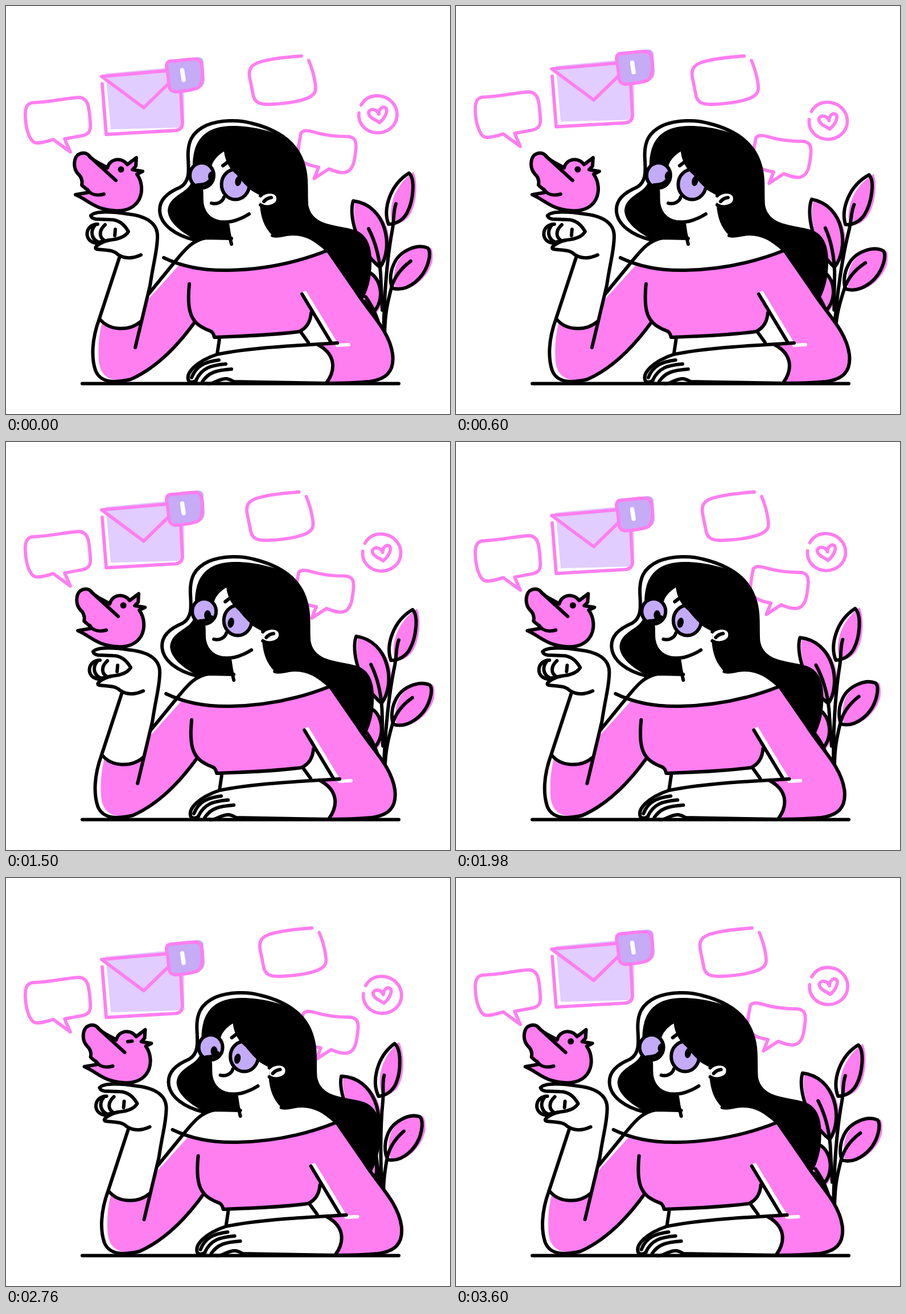
An HTML page for the animation above (3.66 s loop, 780 by 718 pixels).

```html
<!DOCTYPE html>
<html lang="en">
<head>
<meta charset="utf-8">
<title>Woman with a bird and messages</title>
<style>
html, body { margin: 0; width: 100%; height: 100%; overflow: hidden; background: #fff; }
svg { display: block; width: 780px; height: 718px; }
path, circle, ellipse { stroke-linecap: round; stroke-linejoin: round; }
.ink { fill: none; stroke: #000; stroke-width: 6; }
.skin { fill: #fff; stroke: #000; stroke-width: 6; }
.white { fill: #fff; }
.rose { fill: #ff7ef0; }
.roseInk { fill: #ff7ef0; stroke: #000; stroke-width: 6; }
.note { fill: none; stroke: #ff7ef0; stroke-width: 5.8; }
.lens { fill: #c3abf8; }
</style>
</head>
<body>
<svg viewBox="0 0 780 718">
  <defs>
    <clipPath id="lensL"><ellipse cx="344" cy="298" rx="21" ry="22"/></clipPath>
    <clipPath id="lensR"><ellipse cx="403" cy="314" rx="24.500" ry="26.500"/></clipPath>
  </defs>

  <g id="mail">
    <path fill="#e1cdff" d="M175 119 L290 108 L313 142 V205 Q313 214 303 214 L184 217Z"/>
    <path class="note" d="M169 137 L176 226 L298 219 Q309 218 310 207 L307 150 M285 137 L242 179 L168 124 L282 114"/>
    <path fill="#c6abf6" d="M291 94 L336 90 Q348 90 347 102 L349 128 Q349 144 335 146 L297 150 Q285 148 285 138 L283 104 Q283 95 291 94Z"/>
    <path class="note" d="M291 97 C305 97 322 92 335 94 C345 97 344 107 345 117 C345 128 344 139 337 144 C325 149 309 150 297 151 C284 149 287 139 285 128 C285 118 281 109 282 104 Q283 97 291 97Z"/>
    <path d="M309.500 113 L312 130" fill="none" stroke="#fff" stroke-width="7.500"/>
  </g>
  <path id="chatL" class="note" d="M50 170 C80 169 105 162 128 161 C146 162 146 180 148 205 C150 222 144 227 130 229 L103 234 L113 257 L83 235 C70 239 54 244 48 239 C38 231 33 206 34 187 C35 173 42 170 50 170Z"/>
  <path id="chatTop" class="note" d="M519 88 C490 90 461 94 445 99 C430 104 426 112 428 125 L434 155 C436 170 446 174 465 173 C490 172 515 168 530 162 C543 156 546 150 543 135 C541 120 537 108 532 96"/>
  <path id="chatR" class="note" d="M518 224 C522 218 530 219 540 222 C560 228 585 230 600 230 C614 231 616 240 614 255 C612 275 609 290 596 293 C585 295 575 290 567 287 L541 304 L549 284 C532 281 522 277 515 268 C510 260 516 235 518 224Z"/>
  <g id="like" class="note">
    <path d="M624 174 C632 160 645 157 656 158 C674 160 687 174 687 191 C687 210 671 223 652 223 C632 222 618 207 620 188"/>
    <path d="M655 190 C652 181 640 179 637 187 C637 197 650 200 656 205 C664 199 671 187 668 180 C663 174 655 181 655 190"/>
  </g>

  <g id="plant">
    <g class="rose" transform="translate(2 0)">
      <path d="M678 385 C668 360 677 318 714 292 C721 305 721 345 709 365 C702 378 690 384 678 385Z"/>
      <path d="M745 426 C725 418 694 430 684 455 C678 470 678 490 684 499 C709 503 739 480 747 450 C748 440 748 430 745 426Z"/>
      <path d="M612 343 C604 370 615 420 657 462 C686 425 672 354 612 343Z"/>
      <path d="M638 470 C662 480 668 520 648 541 L625 520Z"/>
    </g>
    <g class="ink">
      <path d="M672 384 C662 358 674 315 708 294 C719 304 716 343 704 365 C697 377 685 384 672 384Z"/>
      <path d="M741 426 C723 418 691 430 681 455 C674 470 674 490 680 497 C705 503 734 480 742 450 C745 440 745 430 741 426Z"/>
      <path d="M610 343 C602 367 614 424 657 460 C682 425 668 350 610 343Z"/>
      <path d="M640 470 C660 481 666 520 644 540 L630 520"/>
      <path d="M685 348 C680 362 682 375 679 392 C670 440 664 500 663 590 M711 449 C692 463 680 481 676 500 C668 530 665 550 665 590"/>
      <path d="M637 392 C650 417 656 445 658 470 L661 535 M632 512 C645 530 656 555 660 582"/>
    </g>
  </g>

  <g id="woman">
    <!-- hair -->
    <path class="skin" d="M329 411 C300 404 271 386 270 360 C269 338 289 326 306 319 C323 309 321 290 320 270 C318 240 326 222 352 210 C376 200 410 200 430 206 C476 217 505 238 518 267 C531 297 526 320 528 350 C534 390 580 388 608 396 C640 404 641 440 638 470 C636 490 631 502 625 514 L520 420Z"/>
    <path d="M328 290 C326 250 338 211 398 211 C435 211 470 221 492 232 C525 255 528 305 528 350 C536 391 583 389 608 396 C640 404 641 440 638 470 C636 490 631 502 625 514 L565 432 L395 410 C370 405 350 407 331 410 C311 400 285 382 284 360 C286 340 302 334 316 323 C324 316 329 308 328 290Z"/>

    <!-- skin -->
    <path class="white" d="M383 256 C371 263 362 274 361 284 L341 318 C343 336 342 351 349 364 C357 378 375 382 389 381 L396 409 L352 408 C326 412 312 432 300 446 L246 512 L248 600 L330 664 L562 664 L640 560 L565 430 C540 407 522 399 500 402 C485 406 475 405 468 404 C453 389 448 372 446 352 L448 333 C424 324 400 303 390 276Z"/>
    <path class="ink" d="M343 322 C345 335 341 348 349 362 C358 378 376 383 397 379 Q413 375 427 366 M389 382 Q391 400 396 419"/>
    <path class="skin" d="M447 334 C455 324 477 325 478 338 C479 351 460 358 447 350"/>
    <path class="ink" d="M453 344 Q458 338 466 337 M361 347 C371 350 381 344 383 336 M381 281 L389 275"/>

    <!-- glasses -->
    <ellipse class="lens" cx="344" cy="298" rx="21" ry="22"/>
    <g clip-path="url(#lensL)"><ellipse id="eyeL" cx="344" cy="298" rx="6" ry="9"/></g>
    <path class="ink" d="M336 315 Q351 315 357 308"/>
    <ellipse class="ink" cx="344" cy="298" rx="21" ry="22"/>
    <ellipse class="lens" cx="403" cy="314" rx="24.500" ry="26.500"/>
    <g clip-path="url(#lensR)"><ellipse id="eyeR" cx="403" cy="314" rx="5.500" ry="9"/></g>
    <ellipse class="ink" cx="403" cy="314" rx="24.500" ry="26.500"/>
    <path d="M383 256 C385 275 395 289 405 297 C420 316 433 328 449 334 L475 325 L440 240Z"/>

    <!-- top and sleeves -->
    <path class="rose" d="M304 456 C340 467 375 467 420 465 C480 462 520 449 565 431 L612 498 C638 540 674 570 680 614 C683 647 662 659 630 662 L562 664 C578 647 580 615 553 598 L578 592 L537 540 C533 556 524 570 514 573 C475 579 420 580 368 583 L362 572 C348 570 336 562 331 557 C300 600 265 640 213 658 C180 662 166 650 163 625 C161 598 164 575 169 556 C190 572 216 572 236 556 L249 517Z"/>
    <path class="white" d="M518 505 L527 501 L582 592 L571 594Z"/>
    <path class="white" d="M537 540 L571 593 L530 594 L516 573 C528 567 535 554 537 540Z"/>
    <path fill="none" stroke="#fff" stroke-width="6" d="M582 597 L602 596"/>
    <path class="ink" d="M277 443 C310 459 345 466 390 465 C455 464 510 452 565 430 M396 409 L352 408 C326 412 312 432 300 446 L247 511"/>
    <path class="ink" d="M468 404 C478 407 490 401 502 401 C530 400 547 415 565 430 L612 498 C638 540 673 570 679 612 C683 644 667 657 638 661 Q605 664 562 664"/>
    <path class="ink" d="M322 489 C318 530 322 554 346 566 C357 573 363 569 366 583 C420 581 470 579 515 573 C530 566 535 553 536 540 M375 585 L371 612 M518 574 L531 592 M520 507 L571 592"/>

    <!-- resting forearm -->
    <path class="white" d="M582 593 C500 599 430 602 371 614 C335 625 318 644 321 663 H562 C580 640 576 610 550 597Z"/>
    <g class="ink">
      <path d="M582 593 C500 598 430 601 371 613 C335 625 314 646 321 660 Q327 664 334 659"/>
      <path d="M548 596 C579 613 580 640 563 663 M326 654 C334 633 350 626 374 623 M334 658 C344 637 360 632 386 630 M345 661 C356 644 371 641 396 639 M352 664 C366 667 372 655 388 656 Q394 657 400 661 L450 662 L566 664"/>
    </g>

    <!-- raised arm -->
    <path class="white" d="M200 440 L164 550 C180 572 218 573 238 554 L262 445 C278 390 250 367 215 365 L155 365 L150 410 L162 428Z"/>
    <path class="ink" d="M200 440 L164 550 C150 588 150 620 157 641 C166 665 194 663 219 657 C264 637 300 600 331 557 M164 550 C181 572 216 573 237 555"/>
    <path class="ink" d="M149 369 C156 360 188 362 214 366 C249 370 266 384 266 405 C266 430 260 445 253 492 L227 601"/>
    <path class="skin" d="M161 384 C138 384 136 414 157 417 L181 412 C201 410 210 405 215 397 C207 383 196 376 184 376 L158 375 Q150 374 149 369"/>
    <path class="ink" d="M156 386 C147 397 151 410 161 415 M174 385 C162 396 164 407 173 413 M192 393 L191 404 M181 412 C165 416 151 426 160 428 C178 430 188 429 196 437 C208 445 222 445 237 438"/>

    <!-- bird -->
    <path class="roseInk" d="M178 285 C183 267 204 266 213 279 L229 267 L228 282 L222 288 L240 291 L230 296 C240 310 240 328 234 340 C222 363 194 363 171 357 C151 352 141 340 122 332 L145 328 C143 321 138 321 133 315 C135 307 131 299 127 296 C117 285 119 269 126 262 C135 256 143 259 147 265 C157 275 168 278 178 285Z"/>
    <path class="ink" d="M147 265 L193 307 M143 323 C149 333 161 334 172 331"/>
    <circle id="birdEye" cx="202" cy="287.500" r="5.500"/>
    <path id="birdLid" class="ink" d="M198 288 L206 287"/>
  </g>
  <path class="ink" d="M134 664.500 H690"/>
</svg>
<script>
const LOOP = 3660, STEP = 60;
const KEYS = [-45, 880, 1755, 2680, 3615];
const el = id => document.getElementById(id);
const clamp = x => Math.min(1, Math.max(0, x));
const smooth = x => x * x * (3 - 2 * x);
const ramp = (t, a, b) => smooth(clamp((t - a) / (b - a)));
const move = (id, x, y) => el(id).setAttribute("transform", `translate(${x.toFixed(2)} ${y.toFixed(2)})`);

// Four nearly linear strokes: out, back, out the other way, back.
function sway(t) {
  if (t >= KEYS[4]) t -= LOOP;
  let i = 0;
  while (i < 3 && t >= KEYS[i + 1]) i++;
  const p = (t - KEYS[i]) / (KEYS[i + 1] - KEYS[i]);
  const e = p * 0.8 + smooth(p) * 0.2;
  const reach = i % 2 ? 1 - e : e;
  return { reach, side: i < 2 ? reach : -reach, angle: (i % 2 + p) * Math.PI };
}

function draw(t) {
  const { reach, side, angle } = sway(t);
  move("woman", 17.5 * reach - 0.65, 0);
  move("mail", 0, 0.8 - 20 * side);
  move("chatL", 0, 0.5 - 14.5 * side);
  move("chatTop", 0.7 - 19 * side, 0);
  move("chatR", 2.5 + 6.5 * Math.sin(angle - 0.5), 7.2 - 8 * Math.cos(angle - 0.5));
  move("like", 3.6 - 6.5 * Math.sin(angle + 0.44), 17 * reach - 0.5);
  el("plant").setAttribute("transform", `rotate(${(5.1 * side - 0.2).toFixed(3)} 665 588)`);

  const look = ramp(t, 940, 1090) - ramp(t, 3000, 3150);
  move("eyeL", 17 - 11 * look, 2 + 5 * look);
  el("eyeR").setAttribute("transform",
    `translate(${5 - 17 * look} ${-6 + 10 * look}) rotate(12 403 314)`);

  const shut = [1020, 2760].some(b => Math.abs(t - b) <= STEP);
  el("birdEye").style.display = shut ? "none" : "";
  el("birdLid").style.display = shut ? "" : "none";
}

const start = performance.now();
function tick() {
  const t = (performance.now() - start) % LOOP;
  draw(Math.floor(t / STEP) * STEP);
  requestAnimationFrame(tick);
}
tick();
</script>
</body>
</html>
```
